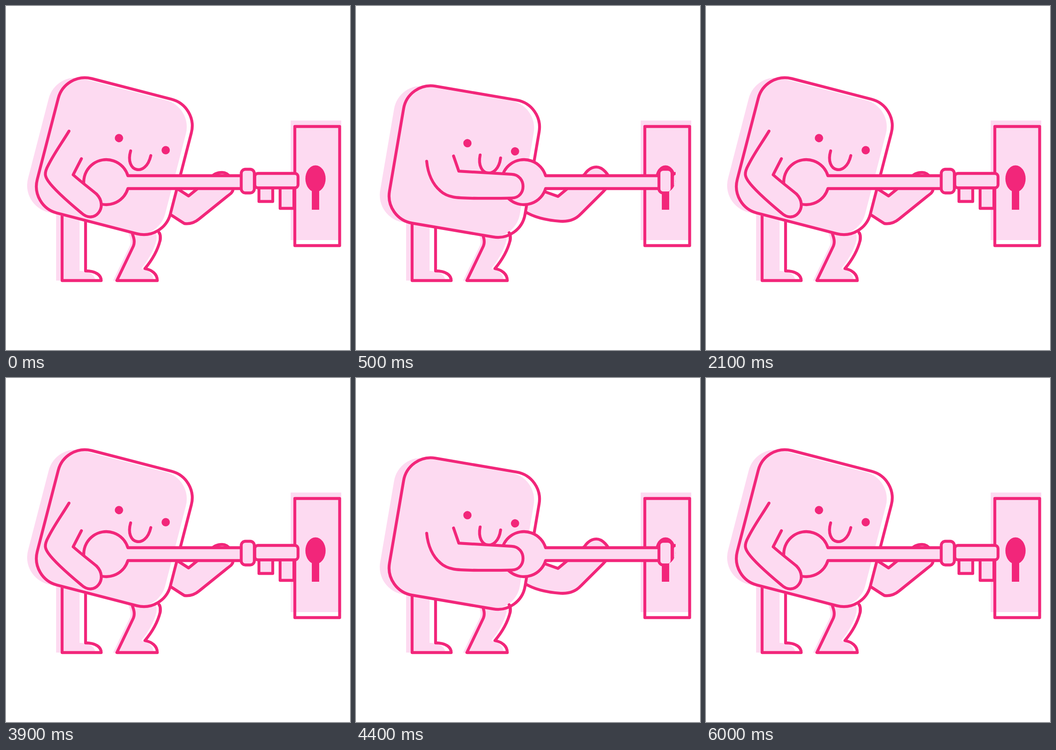
An HTML page for the animation above (7.8 s loop, 748x748 px).

```html
<!DOCTYPE html>
<html lang="en">
<head>
<meta charset="utf-8">
<title>Key and lock</title>
<style>
html, body { margin: 0; width: 100%; height: 100%; overflow: hidden; background: #fff; }
svg { display: block; width: 100%; height: 100%; }
.line { fill: none; stroke: #f2267a; stroke-width: 6.3; stroke-linecap: round; stroke-linejoin: round; }
.tint { fill: #fddaf1; }
.solid { fill: #f2267a; }
</style>
</head>
<body>
<svg viewBox="0 0 748 748">
  <defs>
    <clipPath id="hole"><path d="M0 0H695V375.5A22 29 0 0 1 681 403V748H0Z"/></clipPath>
    <path id="leg1" d="M122 450V597H207C207 585 195 576 173 576V460"/>
    <path id="leg2" d="M272 488C278 503 281 512 277 522L241 597H329C329 583 318 574 302 571C318 552 330 530 335 510C336 503 336 497 333 493"/>
  </defs>

  <!-- lock -->
  <rect class="tint" x="619" y="249" width="110" height="260"/>
  <rect class="line" x="628" y="262" width="97.5" height="259"/>
  <g class="solid">
    <ellipse cx="673" cy="375.5" rx="22" ry="29"/>
    <rect x="665" y="390" width="16" height="53"/>
  </g>

  <path id="backArm" class="line tint"/>

  <!-- legs -->
  <use href="#leg1" class="tint" x="-13"/>
  <use href="#leg2" class="tint" x="-8"/>
  <use href="#leg1" class="line"/>
  <use href="#leg2" class="line"/>

  <!-- body: the tint sits to the left of its outline -->
  <rect class="body" x="-149.5" y="-151" width="299" height="302" rx="60" fill="#fff"/>
  <g transform="translate(-16 0)">
    <rect class="body tint" x="-154" y="-150" width="308" height="300" rx="60"/>
  </g>
  <g class="body">
    <rect class="line" x="-149.5" y="-151" width="299" height="302" rx="60"/>
    <circle class="solid" cx="0" cy="-40.5" r="9"/>
    <circle class="solid" cx="105" cy="-40.5" r="9"/>
    <path class="line" d="M31.5 -20C30 28 78 28 76.5 -21"/>
  </g>
  <path class="line" d="M335 510C336 503 336 497 333 493"/>

  <!-- key -->
  <g clip-path="url(#hole)">
    <g id="key">
      <path class="line tint" d="M550 396V425H580V396M596 396V440H626V396"/>
      <rect class="line tint" x="541" y="364" width="94" height="31.5" rx="7"/>
      <path class="line tint" d="M512 397H265A49 49 0 1 1 265 369H512"/>
      <rect class="line tint" x="511.5" y="355" width="28.5" height="51.5" rx="9"/>
    </g>
  </g>

  <path id="frontArm" class="line tint"/>
</svg>
<style>.line.tint { fill: #fddaf1; }</style>
<script>
const $ = id => document.getElementById(id);
const bodyParts = document.querySelectorAll('.body');

// Each limb has a resting and a reaching pose with matching commands.
const limbs = {
  backArm: [
    'M366 393L397 413L445 374C452 364 461 362 470 362C484 362 497 380 494 398C493 405 489 408 482 413L420 463C408 473 396 474 388 473C378 467 368 460 352 450',
    'M400 400L440 414L498 366C506 354 515 350 524 350C536 350 553 366 552 380C551 389 546 396 539 403L490 452C478 465 462 469 446 468C416 466 388 460 366 446'
  ],
  frontArm: [
    'M137 272C120 300 105 320 92 346C82 364 85 371 92 381C106 401 140 430 164 450C192 476 224 437 197 409C184 398 164 383 146 367L164 332',
    'M154 339C157 366 168 389 185 403C193 410 203 414 214 416C235 420 300 418 342 417C375 416 374 366 341 365C300 363 262 361 225 359L213 326'
  ]
};

const mix = (a, b, k) => a + (b - a) * k;

function mixPath([from, to], k) {
  const ends = to.match(/\d+/g);
  let i = 0;
  return from.replace(/\d+/g, n => mix(+n, +ends[i++], k).toFixed(2));
}

const ease = (x, p) => x < 0.5 ? (2 * x) ** p / 2 : 1 - (2 - 2 * x) ** p / 2;

function reach(t) {
  if (t < 600) return ease(t / 600, 3);
  if (t < 1500) return 1;
  if (t < 2100) return 1 - ease((t - 1500) / 600, 2.5);
  return 0;
}

function draw(now) {
  const t = Math.floor(now / 100) * 100 % 3900; // ten pictures a second
  const k = reach(t);
  for (const id in limbs) $(id).setAttribute('d', mixPath(limbs[id], k));
  $('key').setAttribute('transform', `translate(${150 * k} 0)`);
  const pose = `translate(235.5 ${mix(326.5, 338.5, k)}) rotate(${mix(14.5, 9.6, k)})`;
  bodyParts.forEach(part => part.setAttribute('transform', pose));
}

const start = performance.now();
function tick() {
  draw(performance.now() - start);
  requestAnimationFrame(tick);
}
tick();
</script>
</body>
</html>
```
